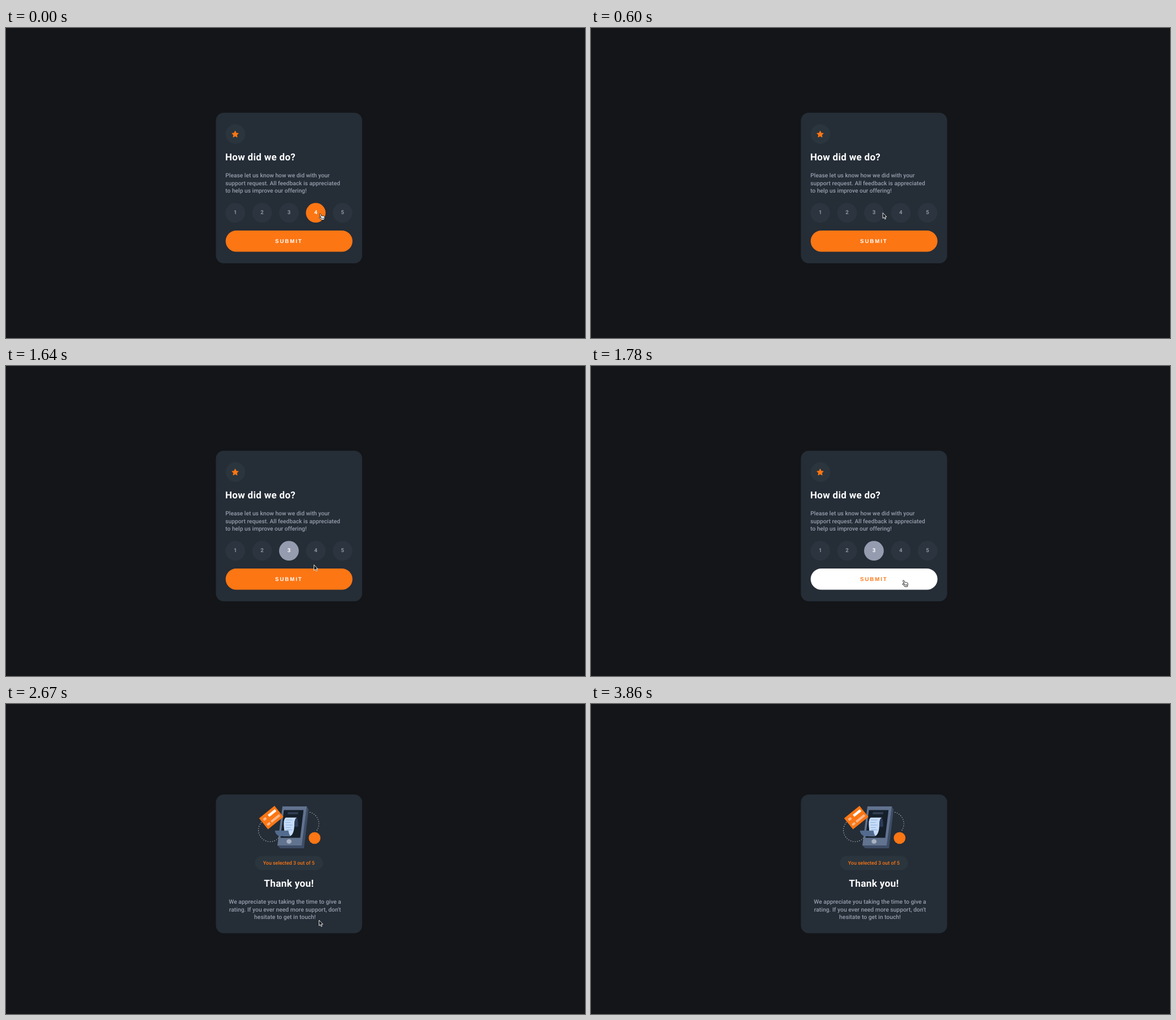
An HTML page that plays this animation: 1022 px wide and 548 px high, repeating every 4.6 s.

```html
<!DOCTYPE html>
<html lang="en">
<head>
<meta charset="utf-8">
<title>Rating card</title>
<style>
  html, body { margin: 0; width: 100%; height: 100%; overflow: hidden; background: #131518; }
  svg { display: block; width: 1022px; height: 548px; }
  text { font-family: Roboto, "Open Sans", sans-serif; text-rendering: geometricPrecision; }
  .title { font-weight: 700; letter-spacing: .3px; fill: #fff; }
  .body { font-weight: 500; fill: #969fad; }
  .mid { text-anchor: middle; }
  .num { font-size: 9.6px; font-weight: 700; text-anchor: middle; }
  .submit { font: 700 9.6px "Liberation Sans", Arial, sans-serif; letter-spacing: 1.95px; }
</style>
</head>
<body>
<svg viewBox="0 0 1022 548">
  <rect width="1022" height="548" fill="#131518"/>

  <g id="ask">
    <rect x="370.5" y="149.7" width="258.2" height="266.3" rx="14" fill="#252d37"/>
    <circle cx="405" cy="187.5" r="17.4" fill="#2b353d"/>
    <polygon id="star" fill="#fc7614" stroke="#fc7614" stroke-width="1.2" stroke-linejoin="round"/>
    <text class="title" x="387" y="234.2" font-size="17">How did we do?</text>
    <g class="body" font-size="10.24">
      <text x="387.3" y="263.7">Please let us know how we did with your</text>
      <text x="387.3" y="277.5">support request. All feedback is appreciated</text>
      <text x="387.3" y="291.3">to help us improve our offering!</text>
    </g>
    <g id="scores"></g>
    <rect id="button" x="387.7" y="358" width="223.9" height="37.6" rx="18.8"/>
    <text id="label" class="submit" x="475.1" y="380.3">SUBMIT</text>
  </g>

  <g id="thanks">
    <rect x="370.5" y="160" width="258.2" height="245.3" rx="14" fill="#252d37"/>
    <g fill="none" stroke="#e4e8ee" stroke-width="1.3" stroke-linecap="round" stroke-dasharray="0 3.9">
      <path d="M450.5 209.5A20.5 20.5 0 0 0 480.5 237.4"/>
      <path d="M536.8 191.5A21 21 0 0 1 548.3 224"/>
    </g>
    <path d="M531 181L534 186.5L526 255H484L479 250L522 249Z" fill="#3e4d66"/>
    <path d="M488 181H531L522 250H479Z" fill="#62738f"/>
    <path d="M490.5 187.5H525.2L519.3 236.5H484.5Z" fill="#151f2a"/>
    <path d="M497.5 191H516L515.4 195H497Z" fill="#303c4f"/>
    <ellipse cx="499.6" cy="243" rx="4.4" ry="4" fill="#a9b2c2"/>
    <path d="M507 201H513Q516 203 515.6 217H509Z" fill="#2c3b56"/>
    <path d="M494 200.8H513.5Q509 202.5 509 212Q509 230 501.5 233.6H490Q492 228 490.5 216Q489.5 203 494 200.8Z" fill="#c6dcf9"/>
    <path d="M494 205H505.5M493 209.5H502.5M493.5 214H505.5M493.5 218.5H502.5M494.5 222.5H505.5" stroke="#8fb0dc" stroke-width="1.1"/>
    <path d="M474.5 223.7H498.5Q499.5 231 502.5 233.7H484Q476 232.5 474.5 223.7Z" fill="#536b8e"/>
    <g transform="translate(468.2 200.8) rotate(-39)">
      <rect x="-17.5" y="-12.5" width="35" height="25" fill="#fc7614"/>
      <rect x="-1.8" y="-7.6" width="16" height="4.6" fill="#fff"/>
      <rect x="-13.2" y="-7.4" width="6" height="4.4" rx="1.4" fill="#fcb78b"/>
      <rect x="-13.8" y="3.8" width="6.4" height="4" fill="#fcb78b"/>
      <rect x="-4.8" y="3.8" width="19" height="4" fill="#fcb78b"/>
    </g>
    <circle cx="544.7" cy="236.8" r="10.4" fill="#fc7614"/>
    <rect x="439.4" y="268.5" width="120.2" height="25.3" rx="12.6" fill="#2b353d"/>
    <text class="mid" x="499.3" y="283.9" font-size="8.9" font-weight="500" fill="#fc7614">You selected 3 out of 5</text>
    <text class="title mid" x="499.4" y="323" font-size="17.2">Thank you!</text>
    <g class="body mid" font-size="10.34">
      <text x="492.5" y="352.7">We appreciate you taking the time to give a</text>
      <text x="492.5" y="366.5">rating. If you ever need more support, don't</text>
      <text x="492.5" y="380.3">hesitate to get in touch!</text>
    </g>
  </g>

  <path id="arrow" d="M.6 .7V10.5L2.8 8.5L4.3 12L5.9 11.3L4.4 7.9H7.4Z" fill="#111" stroke="#fff" stroke-width=".9" stroke-linejoin="round"/>
  <g id="hand" stroke="#111" stroke-width=".9" stroke-linejoin="round" stroke-linecap="round">
    <path fill="#fff" d="M4.2 8.4L1.6 2.3Q1.3 .9 2.4 .7Q3.3 .6 3.7 1.6L5.1 5Q5.7 4 6.8 4.7Q7.7 4 8.5 4.9Q9.6 4.6 10 5.8Q10.8 8 10 9.5L9.6 12H4.8Q4.3 10.6 2.6 9.5L.8 8Q.4 7 1.5 6.7Q2.4 6.7 4.2 8.4Z"/>
    <path fill="none" stroke-width=".6" d="M5.7 8V10.2M7.2 8V10.2M8.6 8V10.2"/>
  </g>
</svg>
<script>
const LOOP = 4600;
const ORANGE = '#fc7614';
const PICKED = '#969caf';
const IDLE = '#2c353f';

// Start time, pointer kind, pointer x and y
const pointer = [
  [0, 'hand', 552, 327.6],
  [150, 'hand', 588, 327.6],
  [450, 'hand', 543, 327.6],
  [600, 'arrow', 514.5, 326],
  [890, 'hand', 507, 329],
  [1040, 'hand', 504, 329],
  [1640, 'arrow', 543, 350.8],
  [1780, 'hand', 549, 378],
  [1930, 'hand', 549.3, 382.8],
  [2670, 'arrow', 552, 381.4],
  [2970, 'arrow', 552, 380.4],
  [3120, 'arrow', 609, 387.6],
  [3270, 'arrow', 833.7, 450.6],
  [3410, 'arrow', 920, 484],
  [3560, 'arrow', 923, 486.5],
  [3710, 'arrow', 989, 517],
  [3860, 'none', 0, 0]
];

// Start time, highlighted score, its colour
const scoreSteps = [
  [0, 4, ORANGE],
  [150, 5, ORANGE],
  [600, 0, IDLE],
  [890, 3, ORANGE],
  [1640, 3, PICKED]
];

const $ = id => document.getElementById(id);
const show = (el, on) => el.setAttribute('visibility', on ? 'visible' : 'hidden');
const stepAt = (steps, t) => steps.findLast(s => s[0] <= t);

$('star').setAttribute('points', Array.from({ length: 10 }, (_, i) => {
  const r = i % 2 ? 2.8 : 5.7;
  const a = (i / 5 - 0.5) * Math.PI;
  return `${404.5 + r * Math.cos(a)},${188 + r * Math.sin(a)}`;
}).join(' '));

$('scores').innerHTML = [1, 2, 3, 4, 5].map(n => {
  const x = 404.7 + (n - 1) * 47.35;
  return `<g><circle cx="${x}" cy="326.7" r="17.4"/><text class="num" x="${x}" y="329.3">${n}</text></g>`;
}).join('');
const scores = [...$('scores').children];

function draw(t) {
  const asking = t < 2670;
  show($('ask'), asking);
  show($('thanks'), !asking);

  const [, active, colour] = stepAt(scoreSteps, t);
  scores.forEach((g, i) => {
    const on = i + 1 === active;
    g.firstChild.setAttribute('fill', on ? colour : IDLE);
    g.lastChild.setAttribute('fill', on ? '#fff' : '#8d95a2');
  });

  const hover = t >= 1780;
  $('button').setAttribute('fill', hover ? '#fff' : ORANGE);
  $('label').setAttribute('fill', hover ? ORANGE : '#fff');

  const [, kind, x, y] = stepAt(pointer, t);
  for (const id of ['arrow', 'hand']) {
    show($(id), id === kind);
    $(id).setAttribute('transform', `translate(${x} ${y})`);
  }
}

const start = performance.now();
function tick() {
  draw((performance.now() - start) % LOOP);
  requestAnimationFrame(tick);
}
tick();
</script>
</body>
</html>
```
